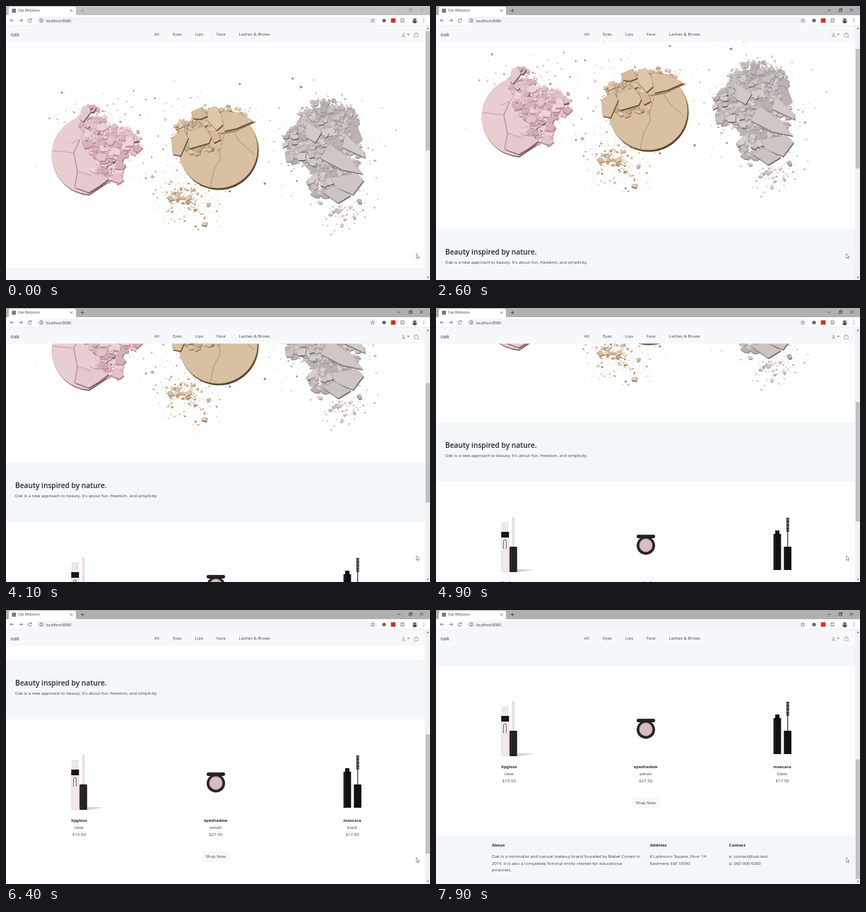
An HTML page that plays this animation: 600 px wide and 388 px high, repeating every 8 s.

```html
<!DOCTYPE html>
<html lang="en">
<head>
<meta charset="utf-8">
<title>Oak Webstore</title>
<style>
  html, body { margin: 0; width: 100%; height: 100%; overflow: hidden; background: #fefefe; }
  svg { display: block; width: 600px; height: 388px; }
  text { font: 6.03px "Open Sans", "Noto Sans", sans-serif; fill: #3c4146; }
  .b { font-weight: 700; fill: #25292d; }
  .h { font-size: 10.2px; font-weight: 600; fill: #212529; }
  .mid text { text-anchor: middle; }
  .line { fill: none; stroke: #5f6368; stroke-width: .8; }
  .thin { fill: none; stroke: #777c81; stroke-width: .5; }
  #bar { fill: #c2c2c2; }
  #win { stroke: #999; }
  .active #bar { fill: #b0b0b0; }
  .active #win { stroke: #333; }
</style>
</head>
<body>
<svg id="stage" viewBox="0 0 600 388">
  <rect width="600" height="388" fill="#fefefe"/>

  <g id="page">
    <g id="photo"></g>
    <rect y="370" width="593" height="84" fill="#f4f7fa"/>
    <text class="h" x="13" y="405.6">Beauty inspired by nature.</text>
    <text x="13" y="419.2">Oak is a new approach to beauty. It's about fun, freedom, and simplicity.</text>

    <g transform="translate(0 299)">
      <!-- lip gloss -->
      <path d="M115 279L138 279.5 130 281 115 283.5Z" fill="#d5d0ce"/>
      <rect x="93.8" y="213" width="8" height="14" fill="#efe9ea" stroke="#c9c1c3" stroke-width=".5"/>
      <rect x="92.7" y="233" width="10.4" height="50" rx="1" fill="#f5e6ea" stroke="#d8c8cd" stroke-width=".5"/>
      <rect x="92.3" y="226" width="11" height="8" fill="#151515"/>
      <path d="M95.5 250V240Q95.5 237 97.5 237T99.5 240V250" fill="none" stroke="#3a3536" stroke-width=".7"/>
      <rect x="108" y="205" width="3" height="43" rx="1" fill="#f3dfe4" stroke="#dcc7cc" stroke-width=".4"/>
      <rect x="104" y="247" width="10.8" height="36" rx="1" fill="#242223"/>
      <path d="M106 249V281" stroke="#4b4748" stroke-width=".7"/>
      <!-- eye shadow -->
      <rect x="284" y="230" width="26" height="5" rx="2.3" fill="#1d1b1c"/>
      <path d="M287 231.3H306" stroke="#666" stroke-width=".5"/>
      <circle cx="297" cy="245.4" r="13" fill="#222021"/>
      <circle cx="297" cy="245" r="10.4" fill="#4b4547"/>
      <circle cx="297" cy="245" r="9.2" fill="#d9bcc0"/>
      <!-- mascara -->
      <path d="M480 229V224H486V229H488.3V280H477.6V229Z" fill="#121212"/>
      <path d="M479.5 231V278M494.2 249V278" stroke="#3c3c3c" stroke-width=".6"/>
      <path d="M497.7 224V248" stroke="#222" stroke-width="1.1"/>
      <path d="M497.7 206V226" stroke="#222" stroke-width="4" stroke-dasharray=".9 .35"/>
      <rect x="492.3" y="247" width="10.6" height="33" rx=".6" fill="#121212"/>
    </g>

    <rect x="277" y="640.4" width="39.3" height="15.4" rx="1.6" fill="#f6f8fa"/>
    <g class="mid">
      <text class="b" x="103.5" y="599.4">lipgloss</text>
      <text x="103.5" y="609.2">clear</text>
      <text x="103.5" y="618.8">$15.50</text>
      <text class="b" x="296.7" y="599.4">eyeshadow</text>
      <text x="296.7" y="609.2">petals</text>
      <text x="296.7" y="618.8">$27.50</text>
      <text class="b" x="490" y="599.4">mascara</text>
      <text x="490" y="609.2">black</text>
      <text x="490" y="618.8">$17.50</text>
      <text x="296.7" y="650.2">Shop Now</text>
    </g>

    <rect y="694" width="593" height="90" fill="#f4f7fa"/>
    <text class="b" x="79" y="710.2">About</text>
    <text x="79" y="726.2">Oak is a minimalist and natural makeup brand founded by Mabel Corwin in</text>
    <text x="79" y="735.7">2019. It is also a completely fictional entity created for educational</text>
    <text x="79" y="745.2">purposes.</text>
    <text class="b" x="302.7" y="710.2">Address</text>
    <text x="302.7" y="726.2">8 Larkmoor Square, Floor 14</text>
    <text x="302.7" y="735.7">Eastmere, EM 10000</text>
    <text class="b" x="414.6" y="710.2">Contact</text>
    <text x="414.6" y="726.2">e: contact@oak.test</text>
    <text x="414.6" y="735.7">p: 000-000-0000</text>
  </g>

  <!-- site header -->
  <rect y="27" width="593" height="23.5" fill="#f6f8fb"/>
  <text x="6.3" y="42.8" style="font-size:7.5px">oak</text>
  <text x="209.8" y="42.2">All</text>
  <text x="236" y="42.2">Eyes</text>
  <text x="267.8" y="42.2">Lips</text>
  <text x="298" y="42.2">Face</text>
  <text x="329.6" y="42.2">Lashes &amp; Brows</text>
  <g class="thin">
    <circle cx="562.5" cy="39.5" r="1.2"/>
    <path d="M560.2 43.3Q560.2 41.3 562.5 41.3T564.8 43.3Z"/>
    <path d="M577.9 39.4H583.3V43.7H577.9ZM579.2 39.4Q579.2 37.5 580.6 37.5T582 39.4"/>
  </g>
  <path d="M567.6 39.4H571L569.3 41.2Z" fill="#555"/>

  <!-- scrollbar -->
  <rect x="593" y="27" width="7" height="361" fill="#f1f1f1"/>
  <path d="M595.4 32.4L597 30.6 598.6 32.4ZM595.4 383.6L597 385.4 598.6 383.6Z" fill="#606060"/>
  <rect id="thumb" x="593.9" y="35.5" width="5.8" height="169" fill="#c1c1c1"/>

  <!-- browser frame -->
  <rect id="bar" width="600" height="13.5"/>
  <path d="M2 13.5Q4 13.5 4 11V3.5Q4 1 6.5 1H96.5Q99 1 99 3.5V11Q99 13.5 101 13.5Z" fill="#fff"/>
  <rect y="13" width="600" height="14.2" fill="#fff"/>
  <path d="M0 27.3H600" stroke="#e3e5e7" stroke-width=".6"/>
  <rect x="8.4" y="3.8" width="5.6" height="5.8" fill="#777"/>
  <text x="17" y="8.4" style="font-size:4.65px">Oak Webstore</text>
  <path d="M91 5L94 8M94 5L91 8" class="line"/>
  <g id="win" fill="none" stroke-width=".7">
    <path d="M105.7 6.5H110.7M108.2 4V9M554 6H558.4M586 3.6L590.2 7.8M590.2 3.6L586 7.8"/>
    <path d="M570.2 4.8H573.4V8H570.2ZM571.2 4.8V3.7H574.5V7H573.4"/>
  </g>
  <rect x="43" y="15.2" width="482" height="10.6" rx="5.3" fill="#f1f3f4"/>
  <text x="56.5" y="22.7" style="font-size:5.27px">localhost:8080</text>
  <g class="line">
    <path d="M11 20.4H6.2M8.4 18.1L6.1 20.4 8.4 22.7"/>
    <path d="M18.5 20.4H23.3M21.1 18.1L23.4 20.4 21.1 22.7"/>
    <path d="M35.8 19A2.5 2.5 0 1 0 36.2 21.2M36.2 17.7V19.4H34.4"/>
    <circle cx="50" cy="20.5" r="2.4"/>
    <path d="M50 20.2V21.9M50 18.9V19.5"/>
    <path d="M519 17.8L519.8 19.6 521.7 19.8 520.3 21.1 520.7 23 519 22 517.3 23 517.7 21.1 516.3 19.8 518.2 19.6Z" style="stroke-width:.6"/>
    <rect x="559" y="18.2" width="4" height="4.4"/>
  </g>
  <circle cx="535" cy="20.5" r="2.6" fill="#666"/>
  <rect x="544.7" y="17.4" width="6.3" height="6.3" fill="#dc2b22"/>
  <circle cx="578.4" cy="20.4" r="4" fill="#d9c9c6"/>
  <path d="M575.4 23.1Q575.8 20.7 578.4 20.7T581.4 23.1Q578.4 26 575.4 23.1Z" fill="#563e43"/>
  <circle cx="578.4" cy="19.3" r="1.5" fill="#563e43"/>
  <path d="M591.3 18V18.9M591.3 20.1V21M591.3 22.2V23.1" stroke="#555" stroke-width="1"/>

  <!-- pointer -->
  <path d="M580.7 350.7V357.3L582.2 355.9 583.2 358.1 584.2 357.6 583.2 355.5H585.2Z" fill="#fff" stroke="#444" stroke-width=".5"/>
</svg>

<script>
const $ = id => document.getElementById(id);
let seed = 11;
const rnd = () => (seed = seed * 16807 % 2147483647) / 2147483647;
const spread = () => rnd() + rnd() + rnd() - 1.5;
const pick = list => list[rnd() * list.length | 0];
const parts = [];
const draw = (d, fill, extra = '') => parts.push(`<path d="${d}" fill="${fill}" ${extra}/>`);

// Rough polygon around a point
function rock(x, y, r) {
  const n = 4 + rnd() * 3 | 0, turn = rnd() * 6;
  return 'M' + Array.from({ length: n }, (_, i) => {
    const a = turn + (i + rnd() * .5) * 6.283 / n, q = r * (.65 + rnd() * .6);
    return (x + q * Math.cos(a)).toFixed(1) + ' ' + (y + q * .85 * Math.sin(a)).toFixed(1);
  }).join('L') + 'Z';
}

// Lit top over a darker, lower side
function stone(x, y, r, c) {
  const d = rock(x, y, r);
  draw(d, rnd() < .2 ? c.shade : c.dark, `transform="translate(${r * .1} ${r * .25})"`);
  draw(d, pick(c.tones));
}

function dust(x, y, w, h, n, c) {
  for (const fill of [c.dark, ...c.tones]) {
    let d = '';
    for (let i = 0; i < n; i++) d += rock(x + spread() * w, y + spread() * h, .35 + rnd() ** 5 * 1.9);
    draw(d, fill);
  }
}

function pile(x, y, w, h, n, size, c) {
  for (let i = 0; i < n; i++) {
    const a = rnd() * 6.283, q = Math.sqrt(rnd());
    stone(x + q * w * Math.cos(a), y + q * h * Math.sin(a), size * (.2 + rnd() ** 3), c);
  }
}

function slab(d, fill, c) {
  draw(d, c.shade, 'transform="translate(.8 1.6)"');
  draw(d, fill, `stroke="${c.dark}" stroke-width=".3"`);
}

const crack = (d, c, width = .7) => draw(d, 'none', `stroke="${c.dark}" stroke-width="${width}"`);

const pink = { tones: ['#ecd3d6', '#e2c3c7', '#d6b1b6'], dark: '#b58d93', shade: '#6d5458' };
const sand = { tones: ['#e0caaf', '#d6bc9d', '#c8aa89'], dark: '#9c7c5b', shade: '#56432f' };
const grey = { tones: ['#d5cecc', '#c9c2c0', '#bab2b1'], dark: '#989090', shade: '#6a6363' };

// Pink powder
dust(135, 190, 68, 66, 130, pink);
slab('M105 157.3A56 56 0 0 0 117 266.9L150 245 140 165Z', '#e8ced1', pink);
crack('M104 172L110 180 106 188 92 195', pink);
crack('M66 205L96 208M101 234L122 240 142 236', pink);
crack('M104 190L96 208 101 234 97 258', pink, 1.3);
pile(122, 162, 18, 19, 90, 7, pink);
pile(150, 194, 39, 26, 260, 8, pink);
pile(144, 230, 24, 20, 110, 8, pink);
slab('M108 143L117 141 120 150 109 164 104 160Z', '#e6cbce', pink);
slab('M101 237L121 241 136 238 145 245 132 255 117 264 98 257Z', '#e5c9cd', pink);
stone(158, 244, 9, pink);
stone(174, 190, 9, pink);
stone(207, 241, 3.2, grey);
stone(187, 178, 3.2, grey);

// Beige powder
dust(285, 190, 72, 80, 85, sand);
dust(258, 276, 46, 34, 95, sand);
draw('M245.5 204.5A56 56 0 1 0 357.5 204.5A56 56 0 1 0 245.5 204.5Z', sand.shade);
draw('M244 202A56 56 0 1 0 356 202A56 56 0 1 0 244 202Z', '#d9c0a3', 'stroke="#b89a7a" stroke-width=".4"');
crack('M309 182L302 205 303 217 294 233 289 257M323 179L329 190 352 211', sand);
crack('M303 181L325 177 353 164', sand, 1.8);
pile(264, 182, 29, 25, 150, 6, sand);
pile(280, 201, 26, 5, 70, 3.5, sand);
pile(302, 150, 42, 9, 70, 4, sand);
slab('M256 178L280 170 291 185 287 194 259 202Z', '#dac2a5', sand);
slab('M286 146L297 142 306 157 307 168 298 176 285 162Z', '#dec7ab', sand);
slab('M304 149L329 151 350 163 327 173 309 177Z', '#dac1a4', sand);
slab('M262 150L278 143 285 156 275 160 264 159Z', '#d5bb9b', sand);
slab('M234 187L251 174 258 187 247 212 236 210Z', '#d8bfa1', sand);
slab('M287 177L300 177 304 189 294 194Z', '#d5b99a', sand);
pile(251, 268, 26, 12, 50, 4, sand);
stone(280, 308, 4.6, sand);
stone(233, 272, 5, sand);
stone(258, 271, 5.5, sand);
stone(286, 281, 4, sand);

// Grey powder
dust(452, 192, 74, 80, 150, grey);
dust(476, 288, 36, 30, 60, grey);
draw('M400 200L414 162 450 140 490 150 505 190 480 215 500 258 470 272 437 242Z', grey.tones[2]);
pile(454, 160, 43, 28, 330, 5.5, grey);
pile(424, 196, 31, 30, 230, 6.5, grey);
pile(466, 208, 36, 32, 190, 6, grey);
pile(456, 252, 28, 20, 130, 6, grey);
slab('M425 163L447 178 438 193 424 186Z', '#d0c9c7', grey);
slab('M458 195L490 219 505 238 476 232 445 216Z', '#cec7c5', grey);
slab('M480 181L507 207 508 215 476 200Z', '#d2cbc9', grey);
slab('M459 243L496 237 506 247 491 267 467 257Z', '#cdc6c4', grey);
slab('M447 263L464 255 488 268 470 279Z', '#cac3c1', grey);
pile(478, 293, 22, 10, 26, 3.6, grey);
stone(475, 310, 4, grey);
stone(500, 276, 4.5, grey);
stone(444, 278, 3.5, grey);
$('photo').innerHTML = parts.join('');

// Time in ms and page scroll in px
const keys = [[0, 0], [1900, 0], [2000, 7], [2600, 54], [3400, 102], [4900, 208], [6400, 299], [7900, 375]];
function scrollAt(t) {
  const i = Math.max(1, keys.findIndex(k => k[0] >= t));
  const [t0, s0] = keys[i - 1], [t1, s1] = keys[i];
  return s0 + (s1 - s0) * (t - t0) / (t1 - t0);
}

const start = performance.now();
function frame() {
  const t = Math.floor((performance.now() - start) % 8000 / 100) * 100;
  const s = Math.round(scrollAt(t));
  $('page').setAttribute('transform', `translate(0 ${-s})`);
  $('thumb').setAttribute('y', 35.5 + s * .47);
  $('stage').classList.toggle('active', t >= 1000);
  requestAnimationFrame(frame);
}
frame();
</script>
</body>
</html>
```
